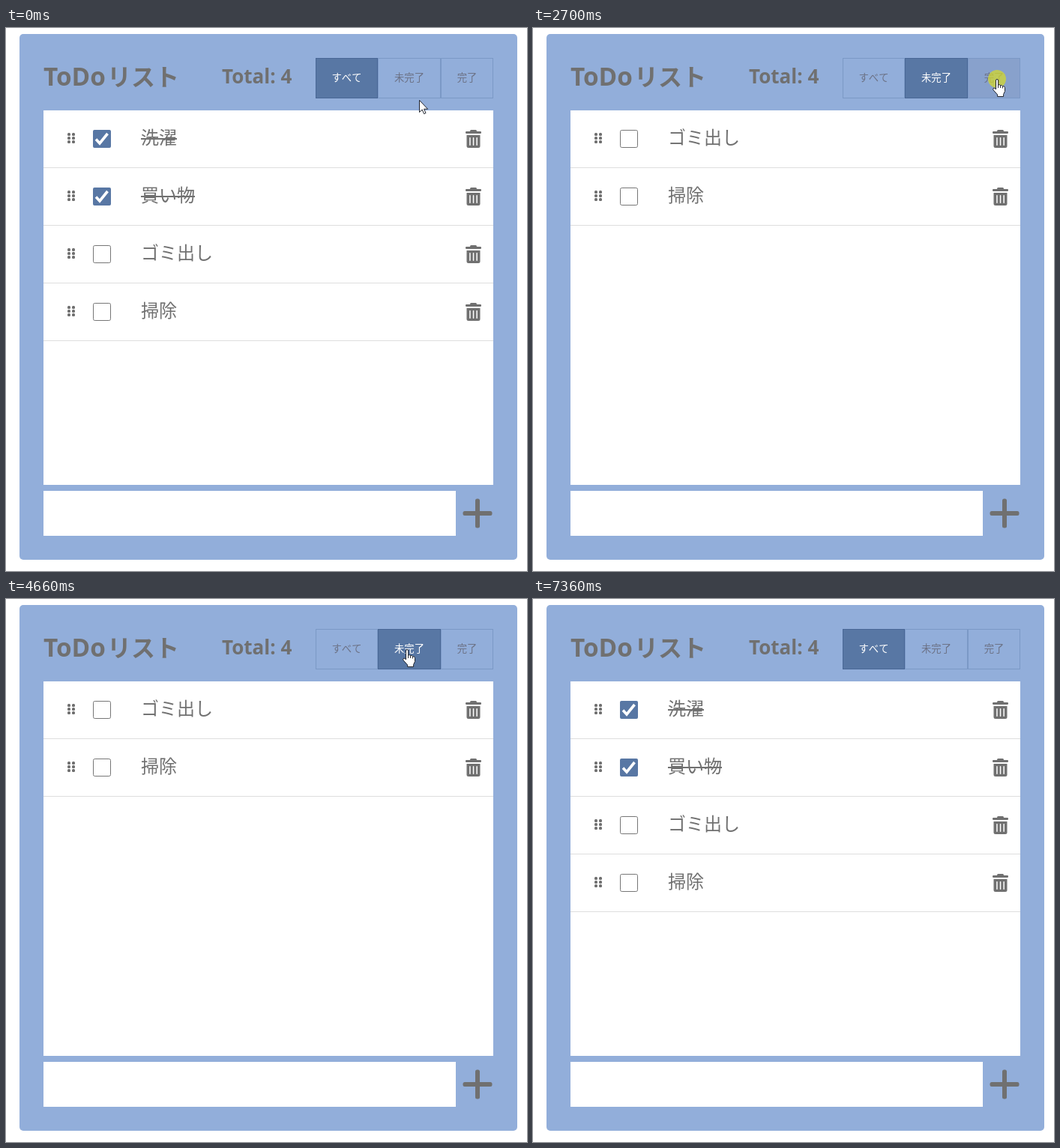
An HTML page with a canvas that plays this animation: 695x725 px, repeating every 7760 ms.

```html
<!DOCTYPE html>
<html lang="ja">
<head>
<meta charset="utf-8">
<title>ToDoリスト</title>
<style>
html, body { margin: 0; width: 100%; height: 100%; overflow: hidden; background: #fff; }
canvas { display: block; width: 695px; height: 725px; }
</style>
</head>
<body>
<canvas id="stage" width="695" height="725"></canvas>
<script>
const ctx = document.getElementById('stage').getContext('2d');

const LOOP = 7760, TICKS = 115, TICK = LOOP / TICKS;
const LATIN = '"Noto Sans", sans-serif';
const JP = '"Noto Sans CJK JP", "Noto Sans CJK", sans-serif';
const GRAY = '#707070', PANEL = '#92aeda', ACCENT = '#5877a4';
const FADE = 3.7;

const BASE_RGB = [146, 174, 218], HOVER_RGB = [136, 161, 204], ACTIVE_RGB = [88, 119, 164];
const EDGE_RGB = [123, 153, 198], ACTIVE_EDGE_RGB = [73, 103, 150];
const LABEL_RGB = [108, 114, 134], WHITE_RGB = [255, 255, 255];

const tasks = [
  { name: '洗濯', done: true },
  { name: '買い物', done: true },
  { name: 'ゴミ出し', done: false },
  { name: '掃除', done: false }
];

const tabs = [
  { label: 'すべて', x: 413, w: 83, test: () => true },
  { label: '未完了', x: 496, w: 84, test: task => !task.done },
  { label: '完了', x: 580, w: 70, test: task => task.done }
];

// Times below are in ticks.
const path = [
  [0, 551, 96], [2, 549, 79], [4, 548, 70], [21, 548, 70],
  [24, 572, 72], [26, 608, 70], [29, 619, 68], [52, 619, 68],
  [55, 568, 68], [57, 555, 68], [67, 555, 68], [69, 535, 67],
  [74, 456, 64], [75, 450, 63], [90, 450, 63], [92, 500, 150],
  [95, 602, 425], [97, 620, 478], [101, 620, 478], [105, 632, 570],
  [109, 645, 745], [TICKS, 645, 745]
];

const clicks = [
  { down: 15, up: 17, tab: 1 },
  { down: 40, up: 42, tab: 2 },
  { down: 61, up: 64, tab: 1 },
  { down: 81, up: 82, tab: 0 }
];

const mix = (a, b, k) => a.map((v, i) => v + (b[i] - v) * k);
const rgb = c => `rgb(${c.map(Math.round).join(',')})`;
const clamp = v => Math.max(0, Math.min(1, v));

function cursorAt(tick) {
  const t = Math.max(0, tick);
  const i = Math.max(1, path.findIndex(p => p[0] >= t));
  const [t0, x0, y0] = path[i - 1], [t1, x1, y1] = path[i];
  const k = (t - t0) / (t1 - t0);
  return [x0 + (x1 - x0) * k, y0 + (y1 - y0) * k];
}

const inBox = ([px, py], x, y, w, h) => px >= x && px < x + w && py >= y && py < y + h;

function rect(x, y, w, h, color) {
  ctx.fillStyle = color;
  ctx.fillRect(x, y, w, h);
}

function round(x, y, w, h, r, color) {
  ctx.fillStyle = color;
  ctx.beginPath();
  ctx.roundRect(x, y, w, h, r);
  ctx.fill();
}

function text(str, x, y, font, color, align = 'left') {
  ctx.font = font;
  ctx.fillStyle = color;
  ctx.textAlign = align;
  ctx.fillText(str, x, y);
}

function stroke(points, width, color) {
  ctx.beginPath();
  points.forEach(([x, y]) => ctx.lineTo(x, y));
  ctx.lineWidth = width;
  ctx.strokeStyle = color;
  ctx.stroke();
}

function drawFrame() {
  rect(0, 0, 695, 725, '#fff');
  round(18, 8, 664, 702, 5, PANEL);
  text('ToDo', 50, 77, `bold 33.3px ${LATIN}`, GRAY);
  text('リスト', 135, 77, `bold 32px ${JP}`, GRAY);
  text('Total: 4', 288, 74, `bold 26px ${LATIN}`, GRAY);
  rect(50, 110, 600, 500, '#fff');
  rect(50, 618, 550, 60, '#fff');
  round(609.5, 645, 39, 6, 2.5, GRAY);
  round(626, 628.5, 6, 39, 2.5, GRAY);
}

function drawTrash(y) {
  round(613, y + 28, 21, 3, 1.2, GRAY);
  round(619, y + 26, 9, 4, 1.5, GRAY);
  round(614.5, y + 33, 18, 17, [0.5, 0.5, 2.5, 2.5], GRAY);
  for (const x of [618.2, 622.8, 627.4]) round(x, y + 36, 1.5, 11, 0.7, '#fff');
}

function drawCheckbox(y, done) {
  if (done) {
    round(116, y + 26, 24, 24, 2, ACCENT);
    stroke([[120, y + 38.5], [125, y + 44], [135.5, y + 31]], 3.6, '#fff');
    return;
  }
  ctx.beginPath();
  ctx.roundRect(116.5, y + 26.5, 23, 23, 2);
  ctx.lineWidth = 1;
  ctx.strokeStyle = '#767676';
  ctx.stroke();
}

function drawTask({ name, done }, row) {
  const y = 110 + row * 77;
  for (let i = 0; i < 6; i++) {
    round(82 + (i % 2) * 6, y + 30 + (i >> 1) * 5, 4, 4, 1.5, GRAY);
  }
  drawCheckbox(y, done);
  text(name, 180, y + 45, `24px ${JP}`, GRAY);
  if (done) rect(180, y + 37, name.length * 24, 2, GRAY);
  drawTrash(y);
  rect(50, y + 76, 600, 1, '#dedede');
}

function drawTab(tab, active, hover) {
  const { x, w, label } = tab;
  rect(x, 40, w, 54, rgb(mix(mix(BASE_RGB, HOVER_RGB, hover), ACTIVE_RGB, active)));
  ctx.lineWidth = 1;
  ctx.strokeStyle = rgb(mix(EDGE_RGB, ACTIVE_EDGE_RGB, active));
  ctx.strokeRect(x + 0.5, 40.5, w - 1, 53);
  text(label, x + w / 2, 71, `13.33px ${JP}`, rgb(mix(LABEL_RGB, WHITE_RGB, active)), 'center');
}

const arrow = new Path2D('M.5 .5V16.5L4.2 13L6.6 18.6L9 17.6L6.6 12.2H11.6Z');
const hand = new Path2D('M4.5 14V2Q4.5 .5 6 .5Q7.6 .5 7.6 2V8Q9.4 7 10.6 8.6Q12.6 7.9 13.4 9.6' +
  'Q16.4 9.2 16.5 11.8V16.5L14.6 20.5V23.5H6.6V21L1 14.8Q0 12.5 2 12Q3.4 12.2 4.5 14Z');
const knuckles = new Path2D('M7.6 8V12M10.6 8.6V12M13.4 9.6V12.5');

function drawCursor(pos) {
  const pointing = inBox(pos, 413, 40, 237, 54) || inBox(pos, 609, 628, 41, 40);
  const shape = pointing ? hand : arrow;
  ctx.save();
  ctx.translate(pos[0] - (pointing ? 6 : 0), pos[1]);
  ctx.fillStyle = '#fff';
  ctx.fill(shape);
  ctx.lineWidth = 1;
  ctx.strokeStyle = '#20242e';
  ctx.stroke(shape);
  if (pointing) ctx.stroke(knuckles);
  ctx.restore();
}

function draw(tick) {
  const last = clicks.filter(c => c.up <= tick).length - 1;
  const current = last < 0 ? 0 : clicks[last].tab;
  const previous = last < 1 ? 0 : clicks[last - 1].tab;
  const fade = last < 0 ? 1 : clamp((tick - clicks[last].up) / FADE);
  const pos = cursorAt(tick);
  const trail = [0, 1, 2].map(d => cursorAt(tick - d));

  drawFrame();
  tasks.filter(tabs[current].test).forEach(drawTask);
  const weight = i => (i === current ? fade : i === previous ? 1 - fade : 0);
  tabs.map((tab, i) => ({ tab, active: weight(i) }))
    .sort((a, b) => a.active - b.active)
    .forEach(({ tab, active }) => {
      const hover = trail.filter(p => inBox(p, tab.x, 40, tab.w, 54)).length / 3;
      drawTab(tab, active, hover);
    });

  if (clicks.some(c => tick >= c.down && tick < c.up)) {
    ctx.beginPath();
    ctx.arc(pos[0], pos[1], 12, 0, Math.PI * 2);
    ctx.fillStyle = 'rgba(214,218,40,.72)';
    ctx.fill();
  }
  drawCursor(pos);
}

const start = performance.now();

function loop() {
  const t = (performance.now() - start) % LOOP;
  draw(Math.min(TICKS - 1, Math.floor((t + 10) / TICK)));
  requestAnimationFrame(loop);
}
loop();
</script>
</body>
</html>
```
